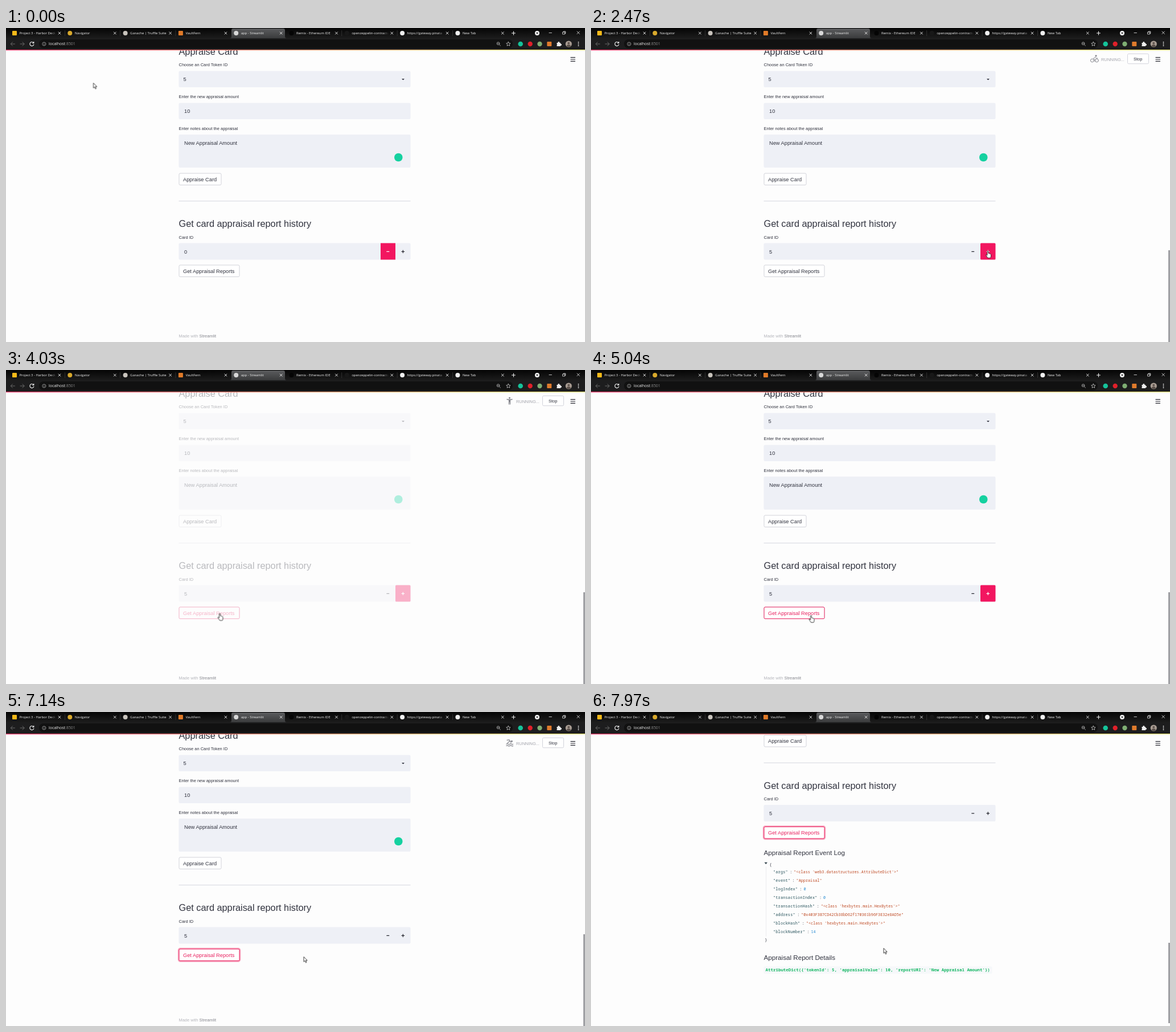
Recreate the animation shown at these times as an HTML page. Size 1017 px wide and 551 px high, loop 8 s.

```html
<!DOCTYPE html>
<html lang="en">
<head>
<meta charset="utf-8">
<title>Card appraisal</title>
<style>
html, body { margin: 0; width: 1017px; height: 551px; overflow: hidden; background: #fdfdfd; }
svg { display: block; }
text { white-space: pre; }
.ui { font-family: "Liberation Sans", Arial, sans-serif; fill: #31333f; }
.bar { font-family: "Open Sans", "Noto Sans", sans-serif; fill: #f1f1f1; }
.code { font-family: "Noto Sans Mono", "DejaVu Sans Mono", monospace; }
.field { fill: #eef0f6; }
.pink { fill: #f21660; }
.line { fill: none; stroke-linecap: round; stroke-linejoin: round; }
#cursor { animation: move 8s infinite; }
#form { animation: stale 8s infinite; }
#page { animation: scroll 8s infinite; }
#thumb { animation: thumb 8s infinite; }
@keyframes move {
  0%, 3% { transform: translate(153.5px, 96.5px); }
  15.6%, 17.2% { transform: translate(727px, 403.5px); }
  19.5%, 41.6% { transform: translate(697px, 391.5px); }
  48.7%, 52.5% { transform: translate(375.5px, 427.5px); }
  61.2%, 72.5% { transform: translate(386.5px, 431px); }
  80%, 89.3% { transform: translate(523px, 429.5px); }
  94%, 100% { transform: translate(514px, 414.5px); }
}
@keyframes stale {
  0% { opacity: 1; animation-timing-function: linear; }
  31.25% { opacity: 1; animation-timing-function: ease-in; }
  43.75%, 61.24% { opacity: .33; }
  61.25% { opacity: 1; animation-timing-function: linear; }
  72.5% { opacity: 1; animation-timing-function: ease-in; }
  84.99% { opacity: .33; }
  85%, 100% { opacity: 1; }
}
@keyframes scroll {
  0%, 93.5% { transform: none; }
  98.7%, 100% { transform: translateY(-214.5px); }
}
@keyframes thumb {
  0%, 93.5% { transform: none; }
  98.7%, 100% { transform: translateY(59px); }
}
</style>
</head>
<body>
<svg id="stage" width="1017" height="551" viewBox="0 0 1017 551"></svg>
<script>
const LOOP = 8000, CLICK = 5300, DONE = 7350;
const stage = document.getElementById('stage');

// y is the middle of the capital letters
const text = (x, y, s, size, attrs = '') =>
  `<text x="${x}" y="${y + size * .36}" font-size="${size}" ${attrs}>${s}</text>`;
const rect = (x, y, w, h, attrs = '') => `<rect x="${x}" y="${y}" width="${w}" height="${h}" ${attrs}/>`;
const dot = (x, y, r, fill) => `<circle cx="${x}" cy="${y}" r="${r}" fill="${fill}"/>`;
const line = (d, color, w = 1) => `<path class="line" d="${d}" stroke="${color}" stroke-width="${w}"/>`;
const during = (spans, body) => `<g data-on="${spans}">${body}</g>`;
const field = (y, h) => rect(303.5, y, 407, h, 'class="field" rx="2"');
const button = (y, w, h, s, color = '#31333f', edge = '#d2d3da') =>
  rect(304, y, w, h, `rx="2" fill="#fff" stroke="${edge}"`) +
  text(311, y + h / 2, s, 9.25, `style="fill:${color}"`);
const minus = color => line('M668.8 392.3h4', color, 1.2);
const plus = color => line('M695 392.3h4.6M697.3 390v4.6', color, 1.2);

function form() {
  const red = '#e8215f';
  const count = [0, 1640, 1760, 1880, 2000, 2120, LOOP];
  let s = text(303.5, 41, 'Appraise Card', 16.3) +
    text(303.5, 64.7, 'Choose an Card Token ID', 7.47) + field(75.5, 28.5) +
    text(311.5, 89.8, '5', 9.25) + '<path d="M695 89h5l-2.5 2.6z"/>' +
    text(303.5, 120.3, 'Enter the new appraisal amount', 7.47) + field(131.5, 28.5) +
    text(313, 146, '10', 9.25) +
    text(303.5, 176.5, 'Enter notes about the appraisal', 7.47) + field(187, 58) +
    text(313, 201.5, 'New Appraisal Amount', 9.25) + dot(689.3, 227, 7.3, '#15d1a0') +
    button(255, 74, 20.5, 'Appraise Card') +
    rect(303.5, 303.2, 407, 1, 'fill="#d5d6df"') +
    text(303.5, 343.3, 'Get card appraisal report history', 16.3) +
    text(303.5, 367.3, 'Card ID', 7.47) + field(377.5, 29);
  for (let n = 0; n < 6; n++) s += during(`${count[n]}-${count[n + 1]}`, text(313, 392.3, n, 9.25));
  s += during(`0-${count[1]}`, rect(658, 377.5, 26, 29, 'class="pink"') + minus('#fff')) +
    during(`${count[1]}-${LOOP}`, minus('#262730')) +
    during(`0-1200 ${CLICK}-${LOOP}`, plus('#262730')) +
    during('1200-1510', plus('#85868e')) +
    during(`1510-${CLICK}`, rect(684, 377.5, 26.5, 29, 'class="pink" rx="1.5"') + plus('#fff')) +
    button(416, 106, 20.5, 'Get Appraisal Reports') +
    during(`${CLICK}-${LOOP}`, rect(303, 415, 108, 22.5, 'rx="3" fill="none" stroke="#f8a3bd" stroke-width="2.4"')) +
    during(`3790-${LOOP}`, button(416, 106, 20.5, 'Get Appraisal Reports', red, red));
  return s;
}

function report() {
  const rows = [
    ['args', `"&lt;class 'web3.datastructures.AttributeDict'>"`], ['event', '"Appraisal"'],
    ['logIndex', 0], ['transactionIndex', 0],
    ['transactionHash', `"&lt;class 'hexbytes.main.HexBytes'>"`],
    ['address', '"0x403F3B7CD42Cb38bD62f170361b96F3E32e8AD5e"'],
    ['blockHash', `"&lt;class 'hexbytes.main.HexBytes'>"`], ['blockNumber', 14]];
  let s = text(303.5, 461.7, 'Appraisal Report Event Log', 11.65) +
    '<path d="M304.5 478.3h5.4l-2.7 3.4z" fill="#37474f"/>' +
    rect(307, 486, .8, 122, 'fill="#e6e7ec"') + '<g class="code">' +
    text(313.5, 481.7, '{', 6.82) + text(305.3, 614.2, '}', 6.82);
  rows.forEach(([key, value], i) => {
    const y = 494.8 + i * 15.1, end = 320 + (key.length + 2) * 4.31;
    s += text(320, y, `"${key}"`, 6.82, 'letter-spacing=".22" style="fill:#25515a"') +
      text(end + 3.4, y, ':', 6.82) +
      text(end + 10.4, y, value, 6.82, `style="fill:${typeof value === 'number' ? '#268bd2' : '#bf4a24'}"`);
  });
  return s + '</g>' + text(303.5, 645.6, 'Appraisal Report Details', 11.65) +
    rect(303.5, 661, 401, 13, 'rx="2" fill="#f6f8fa"') +
    text(306.5, 667.3, `AttributeDict({'tokenId': 5, 'appraisalValue': 10, 'reportURI': 'New Appraisal Amount'})`,
      7.48, 'class="code" font-weight="600" style="fill:#16b864"');
}

function status() {
  const g = '#85868d', head = (x, y) => dot(x, y, 1.6, g);
  const icons = [
    line('M883.3 57a2.9 2.9 0 1 0-5.8 0 2.9 2.9 0 1 0 5.8 0M891.3 57a2.9 2.9 0 1 0-5.8 0 2.9 2.9 0 1 0 5.8 0M885 58.5v-3l-2.5-2 3-2.5 1.8 2h2.5', g) + head(887, 48.8),
    line('M886 51l-2 4 3 2v3.5M884 55l-1.5 3.5H879M886 51l-3.5 1-1 2M886 51l2 2.5h2.5', g, 1.3) + head(887, 48.6),
    line('M880 51.5l4.5.7 4.5-.7M884.5 52v4', g, 1.5) + line('M883.5 53v7M885.5 53v7', g, 1.3) + head(884.5, 49),
    line('M879 56.3q1.5-1.2 3 0t3 0 3 0 2.5 0M879 59.3q1.5-1.2 3 0t3 0 3 0 2.5 0M880 49.3l4-.5 3 5M885 51l-4 3.3', g, 1.2) + head(888.3, 51.3)];
  return icons.map(i => `<g class="sport">${i}</g>`).join('') +
    text(896, 55, 'RUNNING...', 7.45, 'style="fill:#a3a4ac"') +
    rect(942.5, 45.3, 37, 17.4, 'rx="2" fill="#fff" stroke="#d2d3da"') + text(953, 54.3, 'Stop', 7.5);
}

function browser() {
  const tabs = [
    ['Project 3 - Harbor Deck', '#f5b919', 1], ['Navigator', '#d9a92c'], ['Ganache | Truffle Suite', '#c9c4bd'],
    ['VaultFern', '#e07a28', 2], ['app · Streamlit', '#d8d8d8'], ['Remix - Ethereum IDE', '#050505'],
    ['openzeppelin-contracts', '#181818'], ['https://gateway.pinata', '#f0f0f0'], ['New Tab', '#f0f0f0']];
  const cut = [0, 6, 7], white = '#eee', dim = '#6b6b6b';
  let s = rect(0, 0, 1017, 38, 'fill="#1d1d1e"') + rect(0, 0, 1017, 18, 'fill="url(#strip)"') +
    '<path d="M393 18q3 0 3-3V4q0-3 3-3h88q3 0 3 3v11q0 3 3 3z" fill="url(#active)"/>' +
    rect(58, 20, 832, 15.5, 'rx="7.7" fill="#111"');
  tabs.forEach(([title, color, square], i) => {
    const x = 6 + i * 97.3, fill = cut.includes(i) ? 'style="fill:url(#fade)"' : '';
    s += (square ? rect(x + 5, 5, 8, 8, `rx="1" fill="${color}"`) : dot(x + 9, 9, 4, color)) +
      `<svg x="${x + 17.5}" width="66" height="18">${text(0, 9, title.replace('·', '-'), 5.9, fill)}</svg>` +
      line(`M${x + 86} 7l4 4m0-4l-4 4`, white, .9);
    if (i < 8 && i !== 3 && i !== 4) s += rect(x + 97, 4, .6, 10, 'fill="#444"');
  });
  s += line('M888.5 9h6M891.5 6v6', white, 1.1) + dot(933, 9, 4, white) +
    '<path d="M931 8h4l-2 2.5z" fill="#111"/>' +
    line('M954 8.5h4.5M978 7.2h3.6v3.6H978zM979.2 7V6h3.6v3.7h-1M1003 6l4.5 4.5m0-4.5l-4.5 4.5', white, .8) +
    line('M15.5 28h-7m3-3.2L8.3 28l3.2 3.2M25 28h7m-3-3.2l3.2 3.2-3.2 3.2', dim) +
    line('M48.3 26a3.5 3.5 0 1 0 .5 3M48.8 24.3v2.2h-2.2', white, 1.2) +
    line('M70 28a3.1 3.1 0 1 0-6.2 0 3.1 3.1 0 1 0 6.2 0M66.9 27.8v1.8M66.9 26.3v.1', '#aaa', .8) +
    text(75, 27.8, 'localhost<tspan fill="#8d8d8d">:8501</tspan>', 6.95) +
    line('M867 27.2a2.4 2.4 0 1 0-4.8 0 2.4 2.4 0 1 0 4.8 0M866.4 29l2.2 2.2M863.5 27.2h2.2', '#bbb', .8) +
    line('M882.4 24.3l1.1 2.3 2.6.3-1.9 1.8.5 2.6-2.3-1.3-2.3 1.3.5-2.6-1.9-1.8 2.6-.3z', '#ccc', .8) +
    dot(903.7, 28, 4.3, '#15c39a') + dot(920.7, 28, 4.2, '#e0202a') + dot(937.5, 28, 4.2, '#7fae73') +
    rect(950.3, 24, 8, 8, 'rx="1" fill="#df7b2c"') +
    '<path d="M967.5 26h2a1.4 1.4 0 1 1 2.6 0h2v2a1.4 1.4 0 1 1 0 2.6v1.4h-6.6v-2a1.3 1.3 0 0 0 0-2z" fill="#eee"/>' +
    dot(988.3, 28, 5.6, '#a89c92') + dot(988.3, 26.6, 1.9, '#5c514b') +
    '<path d="M984.8 32q0-3 3.5-3t3.5 3q-3.500 2.500-7 0z" fill="#5c514b"/>' +
    [25, 28, 31].map(y => dot(1005.5, y, .9, white)).join('');
  return s + rect(0, 38, 1017, 1.3, 'fill="url(#deco)"');
}

const stops = (...list) => list.map(([o, c, a = 1]) => `<stop offset="${o}" stop-color="${c}" stop-opacity="${a}"/>`).join('');
const arrow = '<path d="M0 0v8.800l2-1.900 1.500 3.400 1.500-.7-1.500-3.200h2.700z" fill="#fff" stroke="#111" stroke-width=".8"/>';
const hand = '<path d="M-1 1q0-1.200 1-1.200t1 1.200v3q1.500-.6 1.800.5 1.300-.4 1.600.6 1.100 0 1.100 1.400v2.500q0 1.700-1 3h-4.500Q-1.500 10-3.300 7.200q-.3-1.300 1-1l1.300 1.300z" fill="#fff" stroke="#111" stroke-width=".8"/>';

stage.innerHTML = `<defs>
  <linearGradient id="strip" x2="0" y2="1">${stops([0, '#050505'], [1, '#1c1c1c'])}</linearGradient>
  <linearGradient id="active" x2="0" y2="1">${stops([0, '#5b5c5e'], [1, '#3a3b3c'])}</linearGradient>
  <linearGradient id="deco">${stops([0, '#f63366'], [1, '#fffd80'])}</linearGradient>
  <linearGradient id="fade" gradientUnits="userSpaceOnUse" x1="55" x2="65">${stops([0, '#f1f1f1'], [1, '#f1f1f1', 0])}</linearGradient>
</defs>
${rect(0, 0, 1017, 551, 'fill="#fdfdfd"')}
<g class="ui">
  <g id="page"><g id="form">${form()}</g>
    ${during(`0-${DONE}`, text(303.5, 540.5, 'Made with <tspan fill="#85868d">Streamlit</tspan>', 7.46, 'style="fill:#b5b6bc"'))}
    ${during(`${DONE}-${LOOP}`, report())}</g>
  ${during(`2050-4980 5400-${DONE}`, status())}
  ${line('M992 51.700h7.500M992 55h7.500M992 58.300h7.500', '#262730', 1.2)}
</g>
${during(`300-${DONE}`, rect(1014, 390, 3, 161, 'fill="#9fa0a4"'))}
${during(`${DONE}-${LOOP}`, rect(1014, 346, 3, 141, 'id="thumb" fill="#9fa0a4"'))}
<g class="bar">${browser()}</g>
<g id="cursor">
  ${during(`0-1510 3390-3790 5930-${LOOP}`, arrow)}
  ${during('1510-3390 3790-5930', hand)}
</g>`;

const timed = [...stage.querySelectorAll('[data-on]')].map(el =>
  ({ el, spans: el.dataset.on.split(' ').map(s => s.split('-').map(Number)) }));
const sports = stage.querySelectorAll('.sport');
let start;

function draw(now) {
  start ??= now;
  const t = (now - start) % LOOP;
  for (const { el, spans } of timed)
    el.style.display = spans.some(([a, b]) => t >= a && t < b) ? '' : 'none';
  sports.forEach((el, i) => el.style.display = i === Math.floor(t / 150) % 4 ? '' : 'none');
  requestAnimationFrame(draw);
}
requestAnimationFrame(draw);
</script>
</body>
</html>
```
